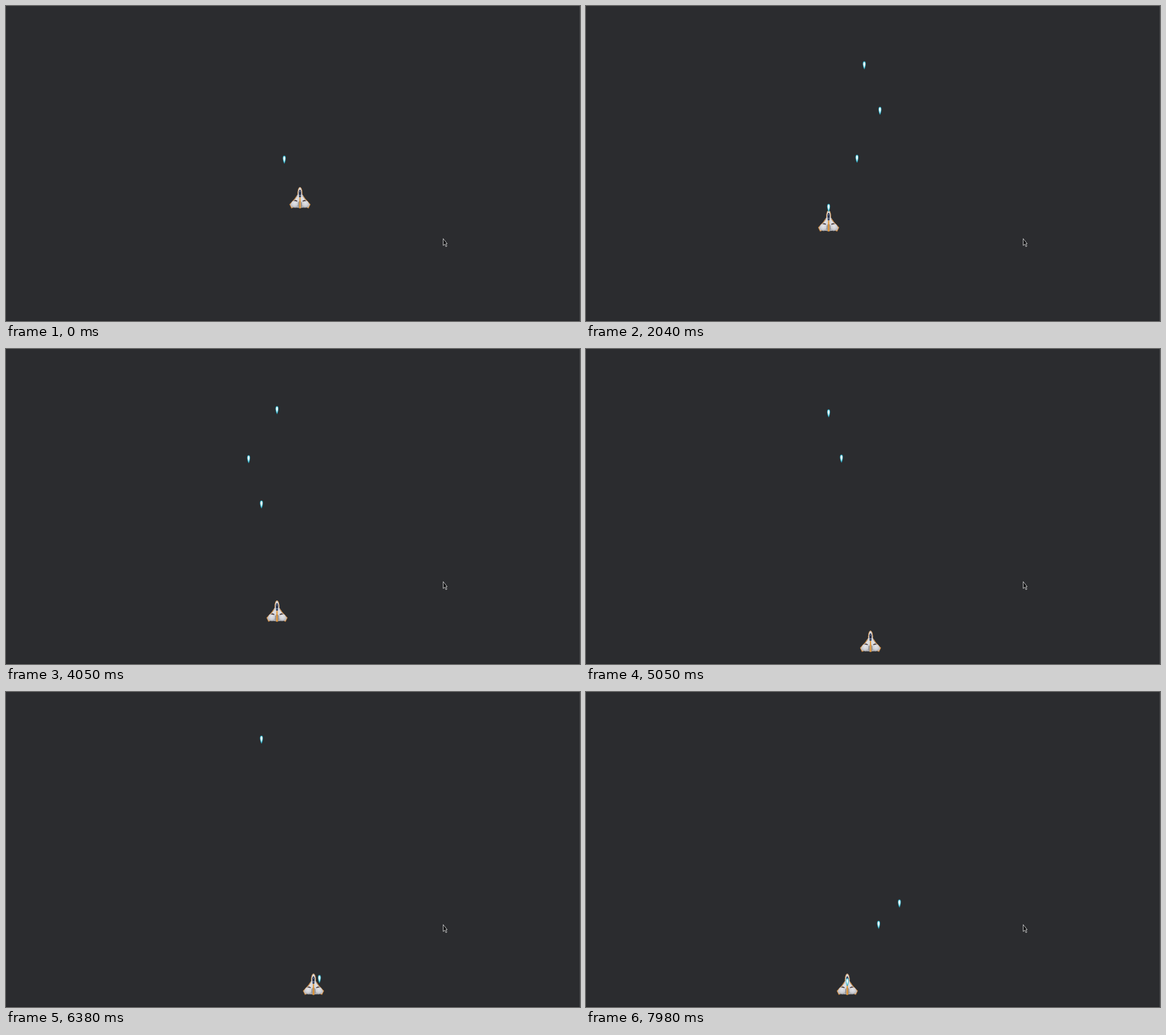
An HTML page for the animation above (8 s loop, 1009x555 px).

```html
<!DOCTYPE html>
<html lang="en">
<head>
<meta charset="utf-8">
<title>Ship</title>
<style>
  html, body { margin: 0; width: 100%; height: 100%; overflow: hidden; background: #2b2c2f; }
  svg { display: block; width: 1009px; height: 555px; }
</style>
</head>
<body>
<svg viewBox="0 0 1009 555" xmlns="http://www.w3.org/2000/svg">
  <defs>
    <radialGradient id="pod" cx=".45" cy=".35" r=".7">
      <stop offset="0" stop-color="#e4e4e8"/>
      <stop offset=".6" stop-color="#cdced3"/>
      <stop offset="1" stop-color="#94969d"/>
    </radialGradient>
    <linearGradient id="bolt" x2="0" y2="1">
      <stop offset="0" stop-color="#d6fbff"/>
      <stop offset=".45" stop-color="#f2feff"/>
      <stop offset="1" stop-color="#6fd6e8"/>
    </linearGradient>
    <g id="half">
      <path d="M-2-7 L-5-5 -9.5 2 -18.2 11.5 -14.8 18.2 -11 16.8 -2 17.5Z" fill="#c3c4ca"/>
      <path d="M-4.8-4 L-9.5 2.4 -17.9 11.5 -14.8 17.9 -12 16.4" fill="none" stroke="#cf8636" stroke-width="1.1"/>
      <path d="M-3.4-4 L-8 3 -3 8Z" fill="#dedfe3"/>
      <circle cx="-8.8" cy="11" r="6.6" fill="url(#pod)"/>
      <path d="M-11.5 5.2 L-8 3.8 -4.4 5 -5 6.4Z" fill="#453637"/>
      <path d="M-2.6 8 V18" stroke="#55504f" stroke-width=".7"/>
    </g>
    <g id="shot">
      <path d="M0-7.2 C2.7-7.2 3-3.5 2.4 0 C1.9 3.3 1.1 5.7 .1 7.2 C-1 5.6-1.9 3.3-2.4 0 C-3-3.5-2.7-7.2 0-7.2Z" fill="#2aa3bb"/>
      <path d="M0-5.9 C1.7-5.9 2-3.2 1.6-.5 C1.3 2 .7 3.7 .1 5 C-.7 3.7-1.3 2-1.6-.5 C-2-3.2-1.7-5.9 0-5.9Z" fill="url(#bolt)"/>
    </g>
  </defs>
  <rect width="1009" height="555" fill="#2b2c2f"/>
  <path d="M0 554.5 H1008" stroke="#242528"/>
  <path d="M1008.5 0 V555" stroke="#414245"/>
  <g id="ship">
    <use href="#half"/>
    <use href="#half" transform="scale(-1 1)"/>
    <path d="M0-19 C2.4-19 4-14 4.2-8 L2.6 6 H-2.6 L-4.2-8 C-4-14-2.4-19 0-19Z" fill="#d9d9dc"/>
    <path d="M-4-6 C-4-14-2.2-18.4 0-18.4 C2.2-18.4 4-14 4-6" fill="none" stroke="#c58137"/>
    <path d="M-1.9-5 L-2.2-11 Q0-18 2.2-11 L1.9-5Z" fill="#27304a"/>
    <path d="M-1.4-11 H1.4" stroke="#8b9bb8"/>
    <path d="M-1.9-4.5 H1.9 L1.5-1 H-1.5Z" fill="#31415f"/>
    <path d="M-1.6-1 V18 M1.6-1 V18" stroke="#e6e3df" stroke-width=".8"/>
    <path d="M-1-1 H1 L1.5 18.5 H-1.5Z" fill="#e0963a"/>
  </g>
  <g id="shots"></g>
  <path d="M768.5 409.8 V422 L771.3 419.5 L773.2 424 L775 423.2 L773.2 418.9 H775.6 Z"
    fill="#0c0d0e" stroke="#dcdcdc" stroke-width=".9" stroke-linejoin="round"/>
</svg>
<script>
const LOOP = 8000, STEP = 58.25, SPEED = 4.75, TOP = 40;

// Keys held: [direction, first step, last step]; ship and shots share one speed.
const holdX = [[1, -14, -8.2], [-1, 7, 26], [1, 39, 49.5], [1, 81, 101.2], [-1, 102.3, 114.5], [-1, 118, 129.6]];
const holdY = [[1, 8, 12.8], [1, 27.1, 30.9], [1, 40.8, 47.3], [1, 58, 80.2]];
const fired = [-14.36, 2.5, 15.5, 30.4, 43.75, 106.8, 114.7, 136];

const travel = (holds, step) => SPEED * holds.reduce(
  (sum, [dir, from, to]) => sum + dir * Math.max(0, Math.min(step, to) - from), 0);
const shipX = step => 489.2 + travel(holdX, step);
const shipY = step => 338 + travel(holdY, step);

const place = (el, x, y) => el.setAttribute("transform", `translate(${x} ${y})`);
const ship = document.getElementById("ship");
const shots = fired.map(() => {
  const el = document.createElementNS("http://www.w3.org/2000/svg", "use");
  el.setAttribute("href", "#shot");
  return document.getElementById("shots").appendChild(el);
});

function draw(ms) {
  const step = Math.max(0, Math.floor((ms - 0.75) / STEP));
  place(ship, shipX(step), shipY(step));
  fired.forEach((at, i) => {
    const y = shipY(at) + 1 - SPEED * (step - at);
    shots[i].style.display = step >= at && y > TOP ? "" : "none";
    place(shots[i], shipX(at), y);
  });
}

const start = performance.now();
function tick() {
  draw((performance.now() - start) % LOOP);
  requestAnimationFrame(tick);
}
tick();
</script>
</body>
</html>
```
